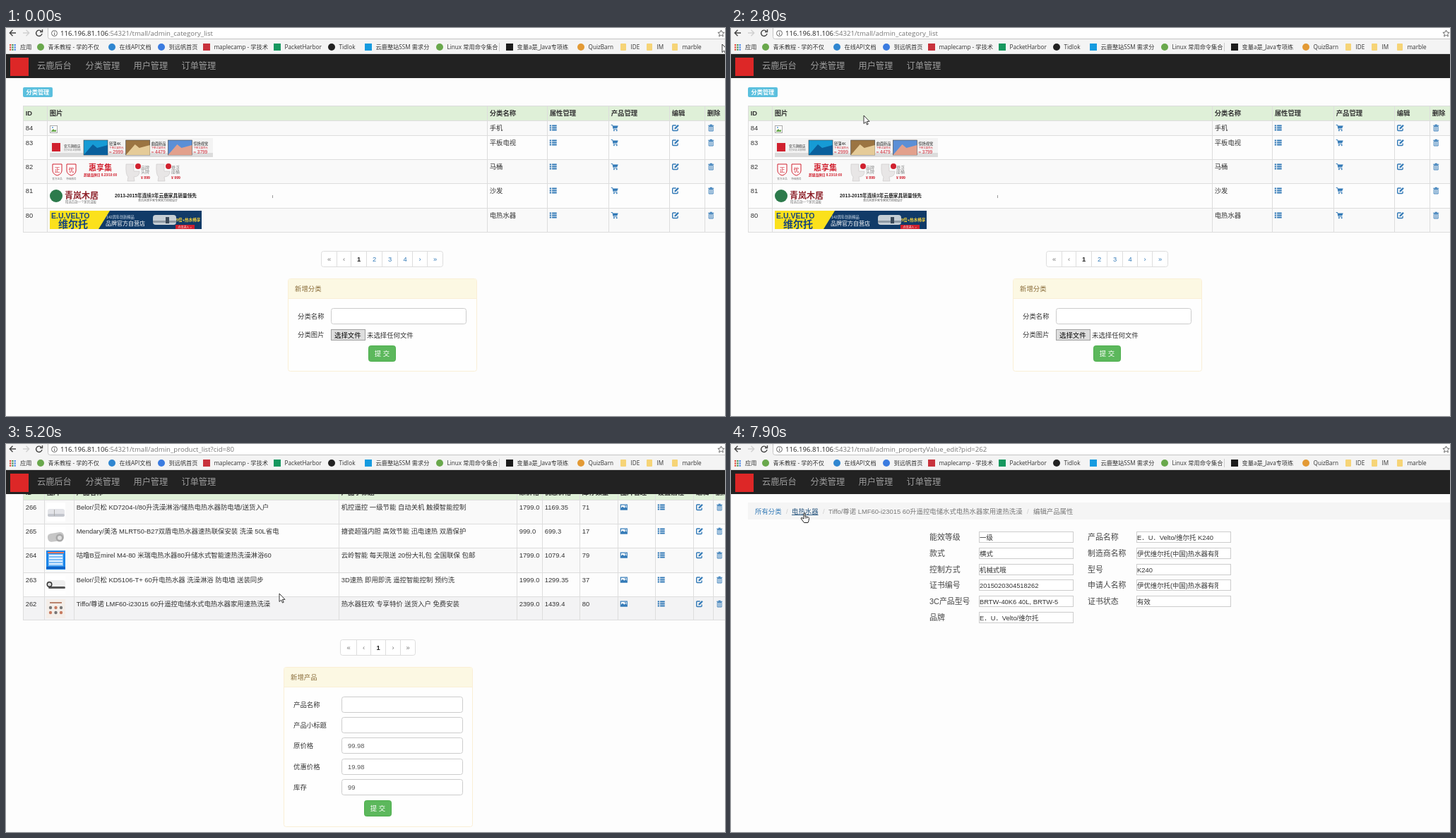
An HTML page for the animation above (8 s loop, 1018 by 550 pixels).

```html
<!DOCTYPE html>
<html lang="zh-CN">
<head>
<meta charset="utf-8">
<title>后台管理</title>
<style>
html, body { margin: 0; width: 100%; height: 100%; overflow: hidden; background: #fdfdfd; }
svg { display: block; }
#stage { position: absolute; left: 0; top: 0; }
text { font-family: "Liberation Sans", "Noto Sans CJK SC", "Noto Sans CJK JP", "Noto Sans CJK", sans-serif; white-space: pre; }
.ui { font-family: "Open Sans", "Noto Sans CJK SC", "Noto Sans CJK JP", "Noto Sans CJK", sans-serif; }
use { color: #337ab7; }
use.used { color: #1d3f5e; }
.crumb.on { text-decoration: underline; fill: #23527c; }
.off { display: none; }
</style>
</head>
<body>
<svg id="stage" width="1018" height="550" viewBox="0 0 1018 550"></svg>
<script>
const BLUE = '#337ab7', RED = '#d0202e', LINE = '#ddd';

// Drawing helpers
const text = (x, y, s, size = 9.4, fill = '#333', extra = '') =>
  `<text x="${x}" y="${y}" font-size="${size}" fill="${fill}" ${extra}>${s}</text>`;
const rect = (x, y, w, h, fill, extra = '') =>
  `<rect x="${x}" y="${y}" width="${w}" height="${h}" fill="${fill}" ${extra}/>`;
const box = (x, y, w, h, fill, stroke, r = 3) =>
  rect(x + .5, y + .5, w - 1, h - 1, fill, `stroke="${stroke}" rx="${r}"`);
const dot = (x, y, r, fill) => `<circle cx="${x}" cy="${y}" r="${r}" fill="${fill}"/>`;
const path = (d, fill, extra = '') => `<path d="${d}" fill="${fill}" ${extra}/>`;
const bold = 'font-weight="700"', mid = 'text-anchor="middle"';

const icon = (id, body) => `<g id="${id}" fill="currentColor">${body}</g>`;
const defs = '<defs>' +
  icon('list', path('M0 1h2.4v2H0zM3.4 1H10v2H3.4zM0 4h2.4v2H0zM3.4 4H10v2H3.4zM0 7h2.4v2H0zM3.4 7H10v2H3.4z', 'currentColor')) +
  icon('cart', path('M0 1h2l1.5 5.8h5.2', 'none', 'stroke="currentColor"') +
    path('M2.4 2H10L8.6 5.4H3.2z', 'currentColor') + dot(4.2, 8.7, 1, 'currentColor') + dot(8, 8.7, 1, 'currentColor')) +
  icon('edit', path('M6 1.5H2q-1 0-1 1V8q0 1 1 1h5.4q1 0 1-1V6', 'none', 'stroke="currentColor" stroke-width="1.4"') +
    path('M3.6 7 4.2 4.8 8.5.4 10.1 2 5.8 6.400z', 'currentColor')) +
  icon('bin', path('M1.5 1.3h8v1h-8zM4 .2h3v1H4z', 'currentColor') +
    path('M2.5 3h6v6.5h-6zM4.5 3v6M6.5 3v6', 'none', 'stroke="currentColor" stroke-width=".9"')) +
  icon('pic', rect(.6, 1.600, 9, 7, '#fff', 'stroke="currentColor" stroke-width="1.2"') +
    path('M1 8.500V6.500L3.500 4l2 2.200L7.500 4.500l2 2.200v1.800z', 'currentColor') + dot(7.2, 3.300, .9, 'currentColor')) +
  '</defs>';

function table(xs, ys, heads, rows) {
  const bottom = ys[ys.length - 1];
  let s = rect(24, ys[0], 994, ys[1] - ys[0], '#dff0d8');
  rows.forEach((r, i) => { if (i % 2 === 0) s += rect(24, ys[i + 1], 994, ys[i + 2] - ys[i + 1], '#f9f9f9'); });
  s += '<rect class="hover" x="24" width="994" fill="#f3f3f4"/>';
  ys.forEach(y => s += rect(24, y, 994, 1, LINE));
  xs.forEach(x => s += rect(x, ys[0], 1, bottom - ys[0], LINE));
  heads.forEach((h, i) => s += text(xs[i] + 3.7, ys[0] + 14, h, 9.4, '#333', bold));
  rows.forEach((row, r) => row.forEach((c, i) => {
    const x = xs[i] + 3.7, y = ys[r + 1];
    s += c[0] === '#' ? `<use href="${c}" x="${x}" y="${y + 5.5}"/>` : text(x, y + 14.3, c);
  }));
  return s;
}

function pager(xs, y, labels, dead) {
  const end = xs[xs.length - 1];
  let s = box(xs[0], y, end - xs[0] + 1, 23, '#fff', LINE);
  labels.split('').forEach((c, i) => {
    if (i) s += rect(xs[i], y, 1, 23, LINE);
    const fill = c === '1' ? '#222' : dead.includes(c) ? '#777' : BLUE;
    s += text((xs[i] + xs[i + 1] + 1) / 2, y + 15, c, 9.4, fill, mid + (c === '1' ? ' ' + bold : ''));
  });
  return s;
}

const panel = (x, y, h, title) =>
  box(x, y, 268, h, '#fefefe', '#faefd6') + rect(x + 1, y + 1, 266, 27, '#fcf8e3') +
  rect(x, y + 28, 268, 1, '#faefd6') + text(x + 10, y + 18, title, 9.4, '#8a6d3b');
const input = (x, y, w, value = '') => box(x, y, w, 23, '#fff', '#ccc') + text(x + 9, y + 15, value, 9.4, '#555');
const submit = (x, y) => box(x, y, 39, 23, '#5cb85c', '#4cae4c') + text(x + 19.5, y + 15, '提 交', 9.4, '#fff', mid);

function crumbs(y, tail) {
  let s = rect(24, y, 994, 24, '#f5f5f5');
  s += text(34, y + 16, '所有分类', 9.4, BLUE, 'class="crumb"') + text(86, y + 16, '电热水器', 9.4, BLUE, 'class="crumb"');
  s += text(78, y + 16, '/', 9.4, '#ccc') + text(130, y + 16, '/', 9.4, '#ccc');
  return s + tail.map(([x, v]) => text(x, y + 16, v, 9.4, v === '/' ? '#ccc' : '#777')).join('');
}

// Category page
function banners() {
  let s = box(62, 138, 11, 11, '#fff', '#aaa', 0) + path('M64 146l3-3 2 2 2-1v3h-7z', '#6aa84f') + dot(66, 141, 1, '#5b9bd5');
  s += rect(62, 156, 231, 27, '#f3f3f3') + rect(62, 177, 231, 6, '#dcdcdc') + rect(65, 163, 12, 12, RED);
  s += text(82, 169, '官方旗舰店', 4.7, '#333') + text(82, 174, '官方正品 全国联保', 2.9, '#777');
  [['#169bd5', '#0a5f9c', '轻薄4K', 2999], ['#9b7442', '#e5cb98', '曲面新品', 4479], ['#5b8fd6', '#e2a08c', '惊艳视觉', 3799]].forEach(([a, b, name, price], i) => {
    const x = 110 + i * 59.7;
    s += rect(x, 159, 34, 21, a, 'stroke="#444" stroke-width=".6"') + path(`M${x} 180l13-15 6 5 15-4v14z`, b);
    s += text(x + 36, 166, name, 5.2, '#222') + text(x + 36, 171, '下单立减百元', 3.4, RED) + text(x + 36, 178, '≈ ' + price, 6.5, RED);
  });
  ['正', '优'].forEach((c, i) => {
    const x = 66 + i * 20;
    s += path(`M${x} 193h13v9q0 5-6.500 7-6.500-2-6.500-7z`, '#fff', `stroke="${RED}"`) + text(x + 6.5, 204, c, 8, RED, mid);
    s += text(x + 6.5, 215, i ? '特级服务' : '官方正品', 3.6, '#777', mid);
  });
  s += text(117, 202, '惠享集', 11, RED, bold) + text(110, 210, '超级品牌日 8.23/10:00', 4.7, RED, bold);
  [165, 208].forEach((x, i) => {
    s += path(`M${x + 5} 193h11v10h8q0 8-8 8l1 6h-10l1-6q-4-3-3-18z`, '#e8e6e6', 'stroke="#c8c4c4" stroke-width=".6"') + dot(x + 22, 196, 4, RED);
    s += text(x + 26, 200, i ? '悬浮' : '品牌', 6, '#888') + text(x + 26, 206, i ? '座桶' : '头牌', 6, '#888');
    s += text(x + 26, 214, i ? '¥ 999' : '¥ 899', 5.2, RED, bold);
  });
  s += dot(71, 238, 9, '#2c7a4b') + text(83, 242, '青岚木居', 12, '#8d2029', bold) + text(84, 248, '精选百款一个家的温暖', 4.4, '#777');
  s += text(154, 240, '2013-2015年连续3年云鹿家具销量领先', 6.7, '#222', bold) + text(187, 246, '青岚木居手家专营官方授权设计', 4, '#555') + rect(377, 237, 1, 4, '#999');
  s += rect(62, 259, 215, 26, '#113b68') + path('M62 259h85l-16 26H62z', '#fbe11c');
  s += text(64, 270, 'E.U.VELTO', 10.5, '#17457c', bold) + text(74, 283, '维尔托', 14, '#17457c', bold);
  s += text(142, 270, '142周年创新精品', 5.2, '#dce7f2') + text(141, 280, '品牌官方自营店', 8, '#fff');
  s += rect(208, 265, 33, 14, '#c5ced5', 'rx="4"') + rect(208, 273, 33, 3, '#8f9aa5') + rect(226, 268, 5, 9, '#3b4a5a');
  return s + text(241, 274, '5倍+热水畅享', 5.6, '#ffd83a', bold) + rect(240, 279, 27, 6, RED) + text(253, 283.7, '点击进入 >', 4, '#fff', mid);
}

function heaters() {
  let s = [133, 167, 201, 236, 270].map(y => rect(57, y, 27, 27, '#fff')).join('');
  s += rect(59, 142, 24, 11, '#e3e4e8', 'rx="3"') + rect(59, 149, 24, 4, '#c3c6cd', 'rx="2"') + rect(68, 143, 1, 9, '#aaa');
  s += rect(59, 176, 23, 12, '#c6c6c6', 'rx="5" transform="rotate(-8 70 182)"') + dot(76, 183, 5.5, '#a8a8a8') + dot(76, 183, 3, '#dedede');
  s += rect(57, 201, 27, 27, '#1b86ea') + rect(60, 206, 21, 17, '#7dbcf5');
  for (let i = 0; i < 4; i++) s += rect(61, 207 + i * 4, 19, 2, '#dff0ff');
  s += rect(59, 203, 23, 2, '#f3765b') + rect(57, 224, 27, 3, '#0f62c4');
  s += rect(58, 243, 26, 11, '#eee', 'rx="4"') + rect(60, 252, 24, 3, '#555', 'rx="1.5"') +
    dot(61.5, 249, 4, '#333') + dot(61.5, 249, 2.5, '#ddd');
  s += rect(57, 270, 27, 27, '#f4eee9') + rect(62, 274, 17, 2, '#b9836d');
  for (let i = 0; i < 6; i++) s += dot(63 + i % 3 * 7.5, 282 + (i / 3 | 0) * 7, 2.2, i % 2 ? '#c77b60' : '#777');
  return s;
}

const catRow = (id, name) => [id, ' ', name, '#list', '#cart', '#edit', '#bin'];
const prodRow = (id, name, note, ...nums) => [id, ' ', name, note, ...nums, '#pic', '#list', '#edit', '#bin'];
const pages = {
  cat: {
    ys: [110, 131, 152, 186, 220, 255, 289], icons: [770, 857, 943, 993], crumbs: false,
    draw() {
      return rect(24, 84, 42, 14, '#5bc0de', 'rx="2"') + text(28.5, 94, '分类管理', 8.2, '#fff', bold) +
        table([24, 58, 681, 766, 853, 939, 989], this.ys, ['ID', '图片', '分类名称', '属性管理', '产品管理', '编辑', '删除'],
          [catRow('84', '手机'), catRow('83', '平板电视'), catRow('82', '马桶'), catRow('81', '沙发'), catRow('80', '电热水器')]) +
        banners() + pager([446, 468, 488, 510, 532, 554, 575, 596, 618], 316, '«‹1234›»', '«‹') +
        panel(399, 355, 132, '新增分类') + text(413, 412, '分类名称') + input(460, 397, 192) + text(413, 438, '分类图片') +
        box(460, 427, 49, 16, '#dedede', '#a0a0a0', 0) + text(465, 438.5, '选择文件', 9.4, '#000') + text(511, 438.5, '未选择任何文件') + submit(513, 450);
    }
  },
  prop: {
    ys: [121, 142, 163, 184, 205, 225, 246], icons: [617, 831], crumbs: true,
    draw() {
      return crumbs(83, [[138, '属性管理']]) +
        table([24, 171, 613, 827], this.ys, ['ID', '属性名称', '编辑', '删除'],
          ['能效等级', '产品名称', '款式', '制造商名称', '控制方式'].map((n, i) => [String(67 - i), n, '#edit', '#bin'])) +
        pager([457, 479, 499, 521, 543, 565, 585, 606], 295, '«‹123›»', '«‹') +
        panel(399, 334, 108, '新增属性') + text(413, 390, '属性名称') + input(472, 376, 180) + submit(513, 405);
    }
  },
  prod: {
    ys: [108, 129, 163, 197, 232, 266, 299], icons: [870, 923, 977, 1005], crumbs: false,
    draw() {
      let s = crumbs(70, [[138, '产品管理']]) +
        table([24, 54, 96, 471, 723, 759, 812, 866, 919, 973, 1001], this.ys,
          ['ID', '图片', '产品名称', '产品小标题', '原价格', '优惠价格', '库存数量', '图片管理', '设置属性', '编辑', '删除'], [
          prodRow('266', 'Belor/贝松 KD7204-I/80升洗澡淋浴/储热电热水器防电墙/送货入户', '机控遥控 一级节能 自动关机 触摸智能控制', '1799.0', '1169.35', '71'),
          prodRow('265', 'Mendary/美洛 MLRT50-B27双盾电热水器速热联保安装 洗澡 50L省电', '搪瓷超强内胆 高效节能 迅电速热 双盾保护', '999.0', '699.3', '17'),
          prodRow('264', '咕噜B豆mirel M4-80 米瑞电热水器80升储水式智能速热洗澡淋浴60', '云岭智能 每天限送 20份大礼包 全国联保 包邮', '1799.0', '1079.4', '79'),
          prodRow('263', 'Belor/贝松 KD5106-T+ 60升电热水器 洗澡淋浴 防电墙 送装同步', '3D速热 即用即洗 遥控智能控制 预约洗', '1999.0', '1299.35', '37'),
          prodRow('262', 'Tiffo/尊诺 LMF60-i23015 60升遥控电储水式电热水器家用速热洗澡', '热水器狂欢 专享特价 送货入户 免费安装', '2399.0', '1439.4', '80')]);
      s += heaters() + pager([473, 496, 516, 537, 558, 579], 327, '«‹1›»', '«‹›»') + panel(393, 366, 227, '新增产品');
      [['产品名称', ''], ['产品小标题', ''], ['原价格', '99.98'], ['优惠价格', '19.98'], ['库存', '99']].forEach(([name, v], i) => {
        const y = Math.floor(408 + i * 29.4);
        s += text(407, y + 15, name) + input(475, y, 172, v);
      });
      return s + submit(507, 555);
    }
  },
  val: {
    ys: [], icons: [], crumbs: true,
    draw() {
      const maker = '伊优维尔托(中国)热水器有限';
      const fields = [['能效等级', '一级', '产品名称', 'E．U．Velto/维尔托 K240'], ['款式', '横式', '制造商名称', maker],
        ['控制方式', '机械式哦', '型号', 'K240'], ['证书编号', '2015020304518262', '申请人名称', maker],
        ['3C产品型号', 'BRTW-40K6 40L, BRTW-5', '证书状态', '有效'], ['品牌', 'E．U．Velto/维尔托']];
      let s = crumbs(83, [[138, 'Tiffo/尊诺 LMF60-i23015 60升遥控电储水式电热水器家用速热洗澡'], [419, '/'], [428, '编辑产品属性']]);
      fields.forEach((f, i) => {
        const y = Math.round(124 + i * 22.8);
        for (let k = 0; k < f.length; k += 2) {
          const x = k ? 574 : 351;
          s += text(k ? 505 : 281, y + 12, f[k], 10.9, '#444') + box(x, y, 134, 16, '#fff', '#ccc', 0) +
            `<svg x="${x}" y="${y}" width="116" height="16">${text(1, 11.5, f[k + 1])}</svg>`;
        }
      });
      return s;
    }
  }
};

// Browser frame and site header
const host = '116.196.81.106', base = ':54321/tmall/';
function chrome() {
  let s = rect(0, 0, 1018, 16, '#f4f4f4') + rect(59.5, -4.5, 980, 20, '#fff', 'stroke="#c4c4c4" rx="3"');
  s += rect(0, 16, 1018, 21, '#f4f4f4') + rect(0, 36, 1018, 1, '#ddd');
  s += path('M14 7H5.5M9.5 2.8 5.3 7l4.2 4.2', 'none', 'stroke="#444" stroke-width="1.4"');
  s += path('M24 7h8.5M28.5 2.8 32.7 7l-4.2 4.2', 'none', 'stroke="#d0d0d0" stroke-width="1.4"');
  s += path('M50 4.5A4.2 4.2 0 1 0 51 8M51.5 2v3.5H48', 'none', 'id="reload" stroke="#444" stroke-width="1.4"');
  s += path('M43 3.5l7.5 7.5M50.5 3.5 43 11', 'none', 'id="stop" stroke="#444" stroke-width="1.4"');
  s += '<circle cx="68.5" cy="7.5" r="4" fill="none" stroke="#666"/>' + rect(68, 7, 1, 3, '#666') + rect(68, 5, 1, 1, '#666');
  s += text(77, 11, `${host}<tspan id="url" fill="#777"></tspan>`, 9.6, '#222', 'class="ui"');
  s += path('M1012.5 3l1.4 3 3.2.4-2.4 2.2.7 3.2-2.9-1.6-2.9 1.6.7-3.2-2.4-2.2 3.2-.4z', 'none', 'stroke="#666"');
  const tones = ['#e34b3f', '#3f8f4f', '#4a86e8', '#f0a830'];
  for (let i = 0; i < 9; i++) s += rect(5 + i % 3 * 3.3, 23 + (i / 3 | 0) * 3.3, 2.2, 2.2, tones[(i + (i / 3 | 0)) % 4]);
  s += text(20, 30, '应用', 8.2, '#333', 'class="ui"');
  [['o', 49, '#69a84c', '青禾教程 - 学的不仅'], ['o', 150, '#2f86d0', '在线API文档'], ['o', 220, '#3a7be0', '到远帆首页'],
   ['s', 284, '#c8323c', 'maplecamp - 学技术'], ['s', 384, '#16985f', 'PacketHarbor'], ['o', 461, '#222', 'Tidlok'],
   ['s', 513, '#159be0', '云鹿整站SSM 需求分'], ['o', 614, '#69a84c', 'Linux 常用命令集合'], ['s', 713, '#1c1c1c', '变量a是_Java专项练'],
   ['o', 814, '#e39a35', 'QuizBarn'], ['f', 874, '', 'IDE'], ['f', 911, '', 'IM'], ['f', 947, '', 'marble']].forEach(([kind, x, c, name]) => {
    s += kind === 'o' ? dot(x, 27, 5, c) : kind === 's' ? rect(x - 5, 22, 10, 10, c) : rect(x - 4, 22, 8, 10, '#f6d477', 'rx="1"');
    s += text(x + 10.5, 30, name, 8.2, '#333', 'class="ui"');
  });
  s += rect(698, 21, 1, 12, '#ccc') + rect(0, 37, 1018, 34, '#222') + rect(6, 42, 26, 26, '#dd2727');
  ['云鹿后台', '分类管理', '用户管理', '订单管理'].forEach((n, i) => s += text([44, 112.5, 180.5, 248.5][i], 57.7, n, 12.2, '#9d9d9d'));
  return s;
}

const $ = id => document.getElementById(id);
$('stage').innerHTML = defs + rect(0, 0, 1018, 550, '#fdfdfd') +
  Object.keys(pages).map(k => `<g id="${k}">${pages[k].draw()}</g>`).join('') + chrome() +
  `<g id="status">${box(-1, 536, 354, 16, '#f1f1f1', '#ccc', 2)}${text(0, 547, '', 8.2, '#666', 'class="ui" id="hint"')}</g>` +
  `<g id="arrow">${path('M0 0v11.5l2.7-2.4 1.8 4 1.7-.8-1.8-3.9h3.6z', '#fff', 'stroke="#222" stroke-width=".9"')}</g>` +
  `<g id="hand">${path('M-1 8V1q0-1.2 1-1.2t1 1.2v3.8l4.5 1q1 .3 1 1.5 0 3-1.5 6.2H-.5L-4.6 8q-.6-1.5.8-1.5z', '#fff', 'stroke="#222"')}${path('M1.5 5v3M3.5 5.5v2.5', 'none', 'stroke="#444" stroke-width=".7"')}</g>`;
const lastCart = document.querySelectorAll('#cat use[href="#cart"]')[4];

// Timeline in ms
const lists = { cat: 'admin_category_list', prop: 'admin_property_list?cid=80', prod: 'admin_product_list?cid=80', val: 'admin_propertyValue_edit?pid=262' };
const shown = [[0, 'cat'], [1500, 'prop'], [2700, 'cat'], [3900, 'prod'], [6200, 'val']];
const address = [[0, 'cat'], [1300, 'prop'], [2600, 'cat'], [3600, 'prod'], [6000, 'val']];
const hints = [[0, ''], [1100, 'prop'], [1500, ''], [2400, 'cat'], [2700, ''], [3400, 'prod'], [3900, ''], [5800, 'val'], [6200, '']];
const scroll = [[0, 0], [4400, 0], [4600, 13], [4800, 13], [5200, 63]];
const mouse = [[0, 1014, 23], [900, 774, 262], [1300, 774, 262], [1900, 150, 118], [2100, 96, 97], [2400, 54, 95], [2700, 54, 96],
  [3300, 859, 264], [3500, 859, 264], [3700, 810, 265], [4400, 385, 224], [4600, 382, 222], [4800, 382, 222], [5200, 387, 212],
  [5700, 926, 226], [6000, 926, 226], [6400, 923, 297], [6600, 914, 299], [7500, 116, 103], [7600, 108, 99], [7900, 104, 98]];

const at = (track, t) => track.filter(k => k[0] <= t).pop()[1];
function tween(track, t, i) {
  const n = track.findIndex(k => k[0] > t);
  if (n < 0) return track[track.length - 1][i];
  const a = track[n - 1], b = track[n];
  return a[i] + (b[i] - a[i]) * (t - a[0]) / (b[0] - a[0]);
}
const show = (el, on) => el.classList.toggle('off', !on);

function render(t) {
  const name = at(shown, t), page = pages[name], g = $(name), url = at(address, t), hint = at(hints, t);
  const x = tween(mouse, t, 1), y = tween(mouse, t, 2);
  const shift = name === 'prod' ? Math.round(13 - tween(scroll, t, 1)) : 0;
  for (const k in pages) show($(k), k === name);
  g.setAttribute('transform', `translate(0 ${shift})`);

  const ry = y + 5 - shift, row = page.ys.findIndex((top, i) => i && ry >= top && ry < page.ys[i + 1]);
  const hover = g.querySelector('.hover');
  if (hover) {
    hover.setAttribute('y', row > 0 ? page.ys[row] : 0);
    hover.setAttribute('height', row > 0 ? page.ys[row + 1] - page.ys[row] : 0);
  }
  let link = row > 0 && y - shift < page.ys[row] + 19 && page.icons.some(ix => Math.abs(x - ix - 5) < 8);
  g.querySelectorAll('.crumb').forEach((el, i) => {
    const on = page.crumbs && y > 88 && y < 102 && x >= 34 + i * 52 && x <= 72 + i * 52;
    el.classList.toggle('on', on);
    link = link || on;
  });
  lastCart.classList.toggle('used', t >= 3500);

  $('url').textContent = base + lists[url];
  show($('stop'), url !== name);
  show($('reload'), url === name);
  show($('status'), hint);
  $('hint').textContent = hint && host + base + lists[hint];
  show($('hand'), link);
  show($('arrow'), !link);
  const place = `translate(${Math.round(x)} ${Math.round(y)})`;
  $('hand').setAttribute('transform', place);
  $('arrow').setAttribute('transform', place);
}

const start = performance.now();
function loop() {
  // The picture advances ten times a second.
  render(Math.floor((performance.now() - start) % 8000 / 100) * 100);
  requestAnimationFrame(loop);
}
loop();
</script>
</body>
</html>
```
